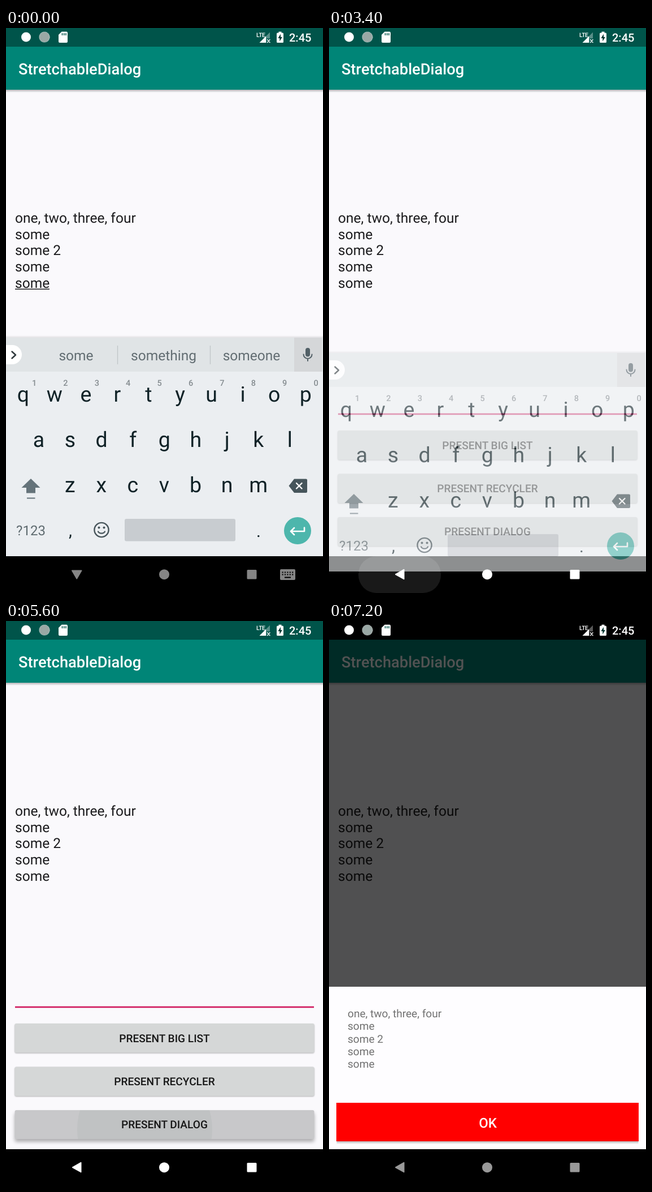
An HTML page for the animation above (8 s loop, 561x998 px).

```html
<!DOCTYPE html>
<html lang="en">
<head>
<meta charset="utf-8">
<title>Stretchable dialog</title>
<style>
html, body { margin: 0; width: 561px; height: 998px; overflow: hidden; background: #faf9fc; }
svg { display: block; font-family: Roboto, sans-serif; text-rendering: geometricPrecision; }
.mid { text-anchor: middle; }
.med { font-weight: 500; }
.line { fill: none; stroke-linecap: round; stroke-linejoin: round; }
.btn { fill: #d5d7d7; filter: drop-shadow(0 1.5px 1px rgba(0,0,0,.3)); }

.t { animation: 8s step-end infinite; }
#caret { animation-name: caret; }
#compose { animation-name: compose; }
#hints { animation-name: hints; }
#keyboard { animation-name: keyboard; }
#ripple { animation-name: ripple; transform-origin: 125px 965px; }
.imeNav { animation-name: imeNav; }
#back { animation-name: back; }
#nav { animation-name: nav; }
#lift { animation-name: lift; }
#press { animation-name: press; }
#dim { animation-name: dim; }
#statusDim { animation-name: statusDim; }
#dialog { animation-name: dialog; }

@keyframes caret {
  0%, 12.5%, 25%, 35%, 42.5%, 56.25%, 100% { opacity: 0; }
  6.25%, 18.75%, 31.25%, 36.25%, 53.75% { opacity: 1; }
}
@keyframes compose { 0% { opacity: 1; } 35%, 100% { opacity: 0; } }
@keyframes hints { 0% { opacity: 1; } 36.25%, 100% { opacity: 0; } }
@keyframes keyboard {
  0% { opacity: 1; transform: none; }
  42.5% { opacity: .6; transform: translateY(27px); }
  43.75% { opacity: .11; transform: translateY(69px); }
  45%, 100% { opacity: 0; transform: translateY(69px); }
}
@keyframes ripple {
  0% { opacity: 0; transform: none; }
  35% { opacity: .06; transform: scale(.7, 1); }
  36.25% { opacity: .1; transform: none; }
  43.75% { opacity: .08; transform: none; }
  45%, 100% { opacity: 0; transform: none; }
}
@keyframes imeNav { 0% { opacity: 1; } 42.5%, 100% { opacity: 0; } }
@keyframes back { 0% { opacity: 0; } 42.5%, 100% { opacity: 1; } }
@keyframes nav {
  0% { fill: #858585; }
  42.5% { fill: #fff; }
  85% { fill: #e2e2e2; }
  86.25% { fill: #c2c2c2; }
  87.5% { fill: #a4a4a4; }
  90%, 100% { fill: #999; }
}
@keyframes lift {
  0%, 76.25%, 100% { fill: #d5d7d7; filter: drop-shadow(0 1.5px 1px rgba(0,0,0,.3)); }
  58.75% { fill: #d5d7d7; filter: drop-shadow(0 3px 2px rgba(0,0,0,.3)); }
  60% { fill: #d5d7d7; filter: drop-shadow(0 5px 3px rgba(0,0,0,.3)); }
  70% { fill: #c8c8ca; filter: drop-shadow(0 5px 3px rgba(0,0,0,.3)); }
}
@keyframes press { 0%, 76.25%, 100% { opacity: 0; } 70% { opacity: 1; } }
@keyframes dim {
  0% { opacity: 0; } 76.25% { opacity: .07; } 77.5% { opacity: .3; }
  78.75% { opacity: .55; } 80%, 100% { opacity: .68; }
}
@keyframes statusDim {
  0% { opacity: 0; } 76.25% { opacity: .03; } 77.5% { opacity: .3; }
  78.75% { opacity: .7; } 80%, 100% { opacity: 1; }
}
@keyframes dialog {
  0% { opacity: 0; } 76.25% { opacity: .35; } 77.5% { opacity: .68; }
  78.75% { opacity: .9; } 80%, 100% { opacity: 1; }
}
</style>
</head>
<body>
<svg width="561" height="998" viewBox="0 0 561 998">
  <defs>
    <linearGradient id="fall" x2="0" y2="1">
      <stop offset="0" stop-opacity=".28"/><stop offset="1" stop-opacity="0"/>
    </linearGradient>
    <linearGradient id="rise" x2="0" y2="1">
      <stop offset="0" stop-opacity="0"/><stop offset="1" stop-opacity=".1"/>
    </linearGradient>
    <clipPath id="btnClip"><rect x="15.500" y="864" width="530" height="51" rx="3"/></clipPath>
  </defs>

  <!-- app -->
  <rect width="561" height="998" fill="#faf9fc"/>
  <rect y="109" width="561" height="5" fill="url(#fall)"/>
  <rect y="33" width="561" height="76" fill="#008577"/>
  <rect width="561" height="33" fill="#00544a"/>
  <text class="med" x="22" y="81.500" font-size="27.270" fill="#fff">StretchableDialog</text>
  <g id="note" font-size="24.540" fill="#1b1b1d"></g>
  <rect id="compose" class="t" x="16" y="460.500" width="61" height="1.500" fill="#1b1b1d"/>
  <rect id="caret" class="t" x="76.300" y="435" width="2.700" height="29" fill="#d81b60"/>
  <rect x="16" y="680.600" width="529" height="2.700" fill="#d01c5f"/>
  <rect class="btn" x="15.500" y="711" width="530" height="51.500" rx="3"/>
  <rect class="btn" x="15.500" y="787.500" width="530" height="51.500" rx="3"/>
  <rect id="lift" class="btn t" x="15.500" y="864" width="530" height="51" rx="3"/>
  <g clip-path="url(#btnClip)">
    <circle id="press" class="t" cx="245.500" cy="898" r="119.500" fill="#c0c2c3"/>
  </g>
  <g class="mid med" font-size="19.090" fill="#161616">
    <text x="280.500" y="743.700">PRESENT BIG LIST</text>
    <text x="280.500" y="820">PRESENT RECYCLER</text>
    <text x="280.500" y="896.300">PRESENT DIALOG</text>
  </g>

  <!-- dialog -->
  <rect id="dim" class="t" width="561" height="933"/>
  <rect id="statusDim" class="t" width="561" height="33"/>
  <g id="dialog" class="t">
    <rect y="646" width="561" height="287" fill="#fefdff"/>
    <g id="copy" font-size="19.090" fill="#717171"></g>
    <rect x="13.500" y="919" width="534" height="5" fill="url(#fall)"/>
    <rect x="13" y="851" width="535" height="68" fill="#f00"/>
    <text class="mid med" x="281" y="894.500" font-size="24" fill="#fff">OK</text>
  </g>

  <rect y="933" width="561" height="65"/>

  <!-- keyboard -->
  <g id="keyboard" class="t">
    <rect y="543" width="561" height="4" fill="url(#rise)"/>
    <rect y="607" width="561" height="326" fill="#ebeef1"/>
    <rect y="547" width="561" height="60" fill="#e0e4e6"/>
    <rect x="510" y="547" width="49" height="60" fill="#d5d7d9"/>
    <path d="M0 560H11a17 17 0 0 1 0 34H0z" fill="#fff"/>
    <path class="line" d="M10.500 571.500l6.500 6-6.500 6" stroke="#30393d" stroke-width="2.500"/>
    <g id="hints" class="t mid" font-size="24.540" fill="#626d72">
      <text x="124" y="587">some</text>
      <text x="279" y="587">something</text>
      <text x="434.500" y="587">someone</text>
      <path d="M197.500 561v33M361.500 561v33" stroke="#c0c5c8" stroke-width="1.300"/>
    </g>
    <rect x="530" y="565" width="8" height="15.500" rx="4" fill="#526067"/>
    <path class="line" d="M526.500 576.500a7.500 7.500 0 0 0 15 0M534 584v4" stroke="#526067" stroke-width="2"/>

    <g id="keys" class="mid" font-size="37.500" fill="#102227"></g>
    <g id="digits" class="mid med" font-size="14.500" fill="#858c90"></g>

    <path d="M44 796l16.500 16H52v9.500H36V812h-8.500z" fill="#65737a"/>
    <rect x="37" y="829.500" width="14.500" height="2" fill="#65737a"/>
    <path d="M510 796.500h21a2 2 0 0 1 2 2v20.500a2 2 0 0 1-2 2h-21l-9.500-12.250z" fill="#46555b"/>
    <path class="line" d="M514 804l9.500 9.500M523.500 804l-9.500 9.500" stroke="#fff" stroke-width="2.400"/>
    <text class="mid" x="44" y="896" font-size="24" fill="#5f6b70">?123</text>
    <text class="mid" x="114" y="898" font-size="30" fill="#102227">,</text>
    <text class="mid" x="447" y="898.500" font-size="30" fill="#102227">.</text>
    <circle class="line" cx="169" cy="886.500" r="12.600" stroke="#46545a" stroke-width="2.400"/>
    <circle cx="164.500" cy="882.500" r="2" fill="#46545a"/>
    <circle cx="173.500" cy="882.500" r="2" fill="#46545a"/>
    <path class="line" d="M163 889.500a6.500 5 0 0 0 12 0" stroke="#46545a" stroke-width="2.200"/>
    <rect x="210" y="867" width="196" height="39.500" rx="3" fill="#c8ccd0"/>
    <circle cx="516" cy="888" r="24" fill="#4db6ac"/>
    <path class="line" d="M528 882.500v6.500h-23M510 883l-6 6 6 6" stroke="#fff" stroke-width="2.600"/>
  </g>

  <!-- navigation bar -->
  <rect id="ripple" class="t" x="52" y="933" width="146" height="65" rx="32" fill="#fff"/>
  <g id="nav" class="t">
    <path class="t imeNav" d="M117 957.500h16.500a1 1 0 0 1 .8 1.500l-8.200 14a1 1 0 0 1-1.700 0l-8.200-14a1 1 0 0 1 .8-1.500z"/>
    <path id="back" class="t" d="M133.500 956.800v16.500a1 1 0 0 1-1.500.8l-14.500-8.200a1 1 0 0 1 0-1.700l14.500-8.200a1 1 0 0 1 1.500.8z"/>
    <circle cx="280" cy="965.200" r="9"/>
    <rect x="426.500" y="957" width="17" height="16.500" rx="1.500"/>
    <g class="t imeNav">
      <rect x="485" y="956" width="27" height="19" rx="2"/>
      <path d="M488.500 961.500h20M488.500 965.500h20" stroke="#000" stroke-width="2.200" stroke-dasharray="2.200 2.200"/>
      <path d="M493 970.500h11" stroke="#000" stroke-width="2.200"/>
    </g>
  </g>

  <!-- status icons -->
  <g fill="#fff">
    <circle cx="35.500" cy="16" r="8.500"/>
    <circle cx="68" cy="16" r="9" fill="#9aa8a5"/>
    <circle cx="68" cy="16" r="9" fill="none" stroke="#d5dddb" stroke-width="1.200" stroke-dasharray="1.400 1"/>
    <path d="M98.500 6.500h8.500a2 2 0 0 1 2 2v15.500a2 2 0 0 1-2 2H95a2 2 0 0 1-2-2V12z"/>
    <path d="M99.500 9v4M102.800 9v4M106 9v4" stroke="#00544a" stroke-width="1.500"/>
    <text class="med" x="443" y="16" font-size="10.500" letter-spacing="-.5">LTE</text>
    <path d="M467 7.500v11h-6v7.500H449z" opacity=".35"/>
    <path d="M460 14.500v11.500h-11.500z"/>
    <path class="line" d="M462.500 20.500l4.500 5M467 20.500l-4.500 5" stroke="#fff" stroke-width="1.400"/>
    <path d="M482.500 6.500h5v2h2a1.500 1.500 0 0 1 1.500 1.500v14.500a1.500 1.500 0 0 1-1.500 1.500h-9a1.500 1.500 0 0 1-1.500-1.500V10a1.500 1.500 0 0 1 1.500-1.500h2z"/>
    <path d="M486 10.500l-4.500 7.500h2.800v5.500l4.500-7.500H486z" fill="#00352f"/>
    <text class="med" x="501" y="24" font-size="20">2:45</text>
  </g>
</svg>
<script>
const NOTE = ['one, two, three, four', 'some', 'some 2', 'some', 'some'];
const PITCH = 55.55;

function put(id, label, x, y) {
  const el = document.createElementNS('http://www.w3.org/2000/svg', 'text');
  el.setAttribute('x', x);
  el.setAttribute('y', y);
  el.textContent = label;
  document.getElementById(id).append(el);
}

NOTE.forEach((line, i) => {
  put('note', line, 16, 344 + i * 28.7);
  put('copy', line, 33, 699.8 + i * 22.4);
});

[['qwertyuiop', 30.3], ['asdfghjkl', 58], ['zxcvbnm', 113.3]].forEach(([row, left], r) =>
  [...row].forEach((key, i) => put('keys', key, left + i * PITCH, 660 + r * 80)));

[...'1234567890'].forEach((d, i) => put('digits', d, 50 + i * 55.4, 631.5));
</script>
</body>
</html>
```
